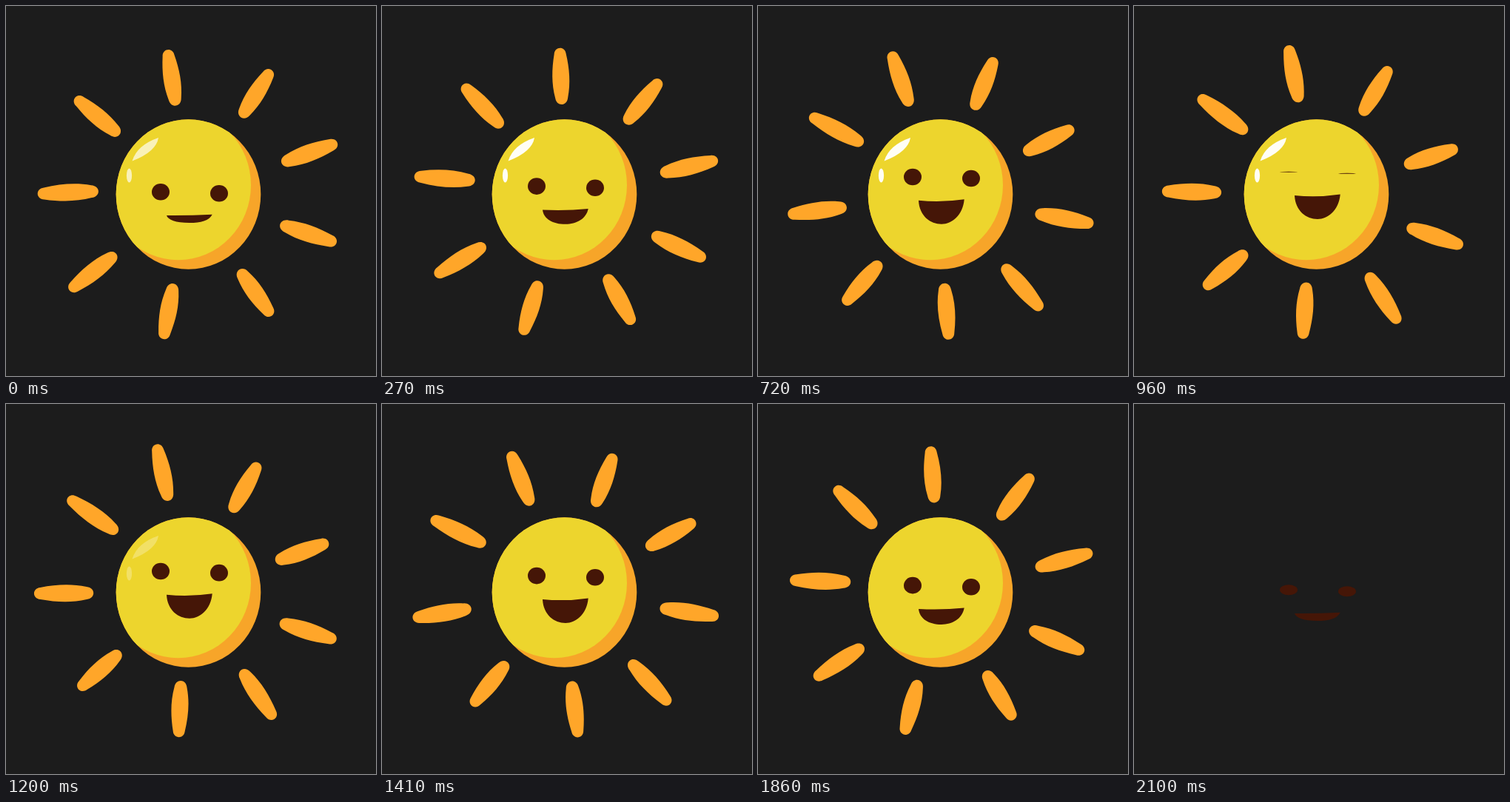
An HTML page for the animation above (2.13 s loop, 500x500 px).

```html
<!DOCTYPE html>
<html>
<head>
<meta charset="utf-8">
<style>
html, body { margin: 0; width: 100%; height: 100%; overflow: hidden; background: #1c1c1c; }
svg { display: block; width: 100vw; height: 100vh; }
</style>
</head>
<body>
<svg viewBox="0 0 500 500">
  <defs>
    <clipPath id="disc"><ellipse cx="246.5" cy="254.5" rx="97.8" ry="101.2"/></clipPath>
    <path id="ray" d="M-8-31C-7-42 7-42 8-31C12-10 13 10 8.5 30C7 42-7 42-8.5 30C-13 10-12-10-8-31Z"/>
  </defs>
  <g id="sun">
    <g id="rays" fill="#ffa629"></g>
    <ellipse cx="246.5" cy="254.5" rx="97.8" ry="101.2" fill="#f7a529"/>
    <ellipse cx="232.7" cy="242" rx="98.3" ry="101.2" fill="#edd52d" clip-path="url(#disc)"/>
    <g id="shine" fill="#fffef5">
      <path d="M170.5 209.5Q177 188 206 178Q203 197 170.5 209.5Z"/>
      <ellipse cx="166.5" cy="229" rx="3.6" ry="9.6"/>
    </g>
  </g>
  <g id="face" fill="#451607">
    <ellipse cx="209" cy="251.2" rx="12"/>
    <ellipse cx="288" cy="253.3" rx="12"/>
    <path id="mouth"/>
  </g>
</svg>
<script>
const $ = id => document.getElementById(id);
const LOOP = 2130, STEP = 30, PEAK = 1050, END = 2070;

const clamp = x => Math.min(1, Math.max(0, x));
const ramp = (t, a, b) => clamp((t - a) / (b - a));
const smooth = x => x * x * (3 - 2 * x);
const mix = (a, b, k) => a + (b - a) * k;

// centre x, centre y, direction, length
$('rays').innerHTML = [
  [224, 97, -8.5, 76], [338, 118.5, 32.5, 76], [410, 198.5, 70, 80],
  [408.5, 307.5, 108.5, 80], [337, 387.5, 144.6, 76], [219.5, 412.5, 190.5, 76],
  [117.5, 359.5, 232, 80], [84, 252, 267.5, 82], [123.5, 149, 310.2, 78]
].map(([x, y, a, len]) =>
  `<use href="#ray" transform="translate(${x} ${y}) rotate(${a}) scale(1 ${len / 78})"/>`
).join('');

const eyes = document.querySelectorAll('#face ellipse');

function mouthPath(k) {
  const m = (a, b) => mix(a, b, k);
  const low = m(293, 315);
  return `M217 283Q248 ${m(283.3, 286)} 278.7 ${m(281.7, 281.5)}` +
    `C${m(275, 277)} ${m(290, 303)} ${m(263, 262)} ${low} 248 ${low}` +
    `C${m(229, 233)} ${low} ${m(219, 218)} ${m(289, 304)} 217 283Z`;
}

function draw(t) {
  // out and back, peaking halfway
  const swing = t < PEAK ? ramp(t, 0, PEAK) : 1 - ramp(t, PEAK, END);
  $('rays').setAttribute('transform', `rotate(${40 * smooth(swing)} 250 250)`);
  $('face').setAttribute('transform', `translate(0 ${-29.5 * swing})`);

  const open = smooth(ramp(t, 0, 600)) - smooth(ramp(t, 1650, END));
  $('mouth').setAttribute('d', mouthPath(open));

  const blink = Math.max(1 - Math.abs(t - 960) / 150, ramp(t, 2040, 2190));
  eyes.forEach(e => e.setAttribute('ry', mix(11.3, 0.5, clamp(blink))));

  const shine = t < PEAK ? mix(0.7, 1, ramp(t, 0, 90))
    : 1 - ramp(t, PEAK, 1260) + 0.7 * ramp(t, 1890, END);
  $('shine').setAttribute('opacity', shine);
  $('sun').setAttribute('visibility', t < 2100 ? 'visible' : 'hidden');
}

const start = performance.now();
function tick() {
  const t = (performance.now() - start) % LOOP;
  draw(Math.floor(t / STEP) * STEP);
  requestAnimationFrame(tick);
}
tick();
</script>
</body>
</html>
```
